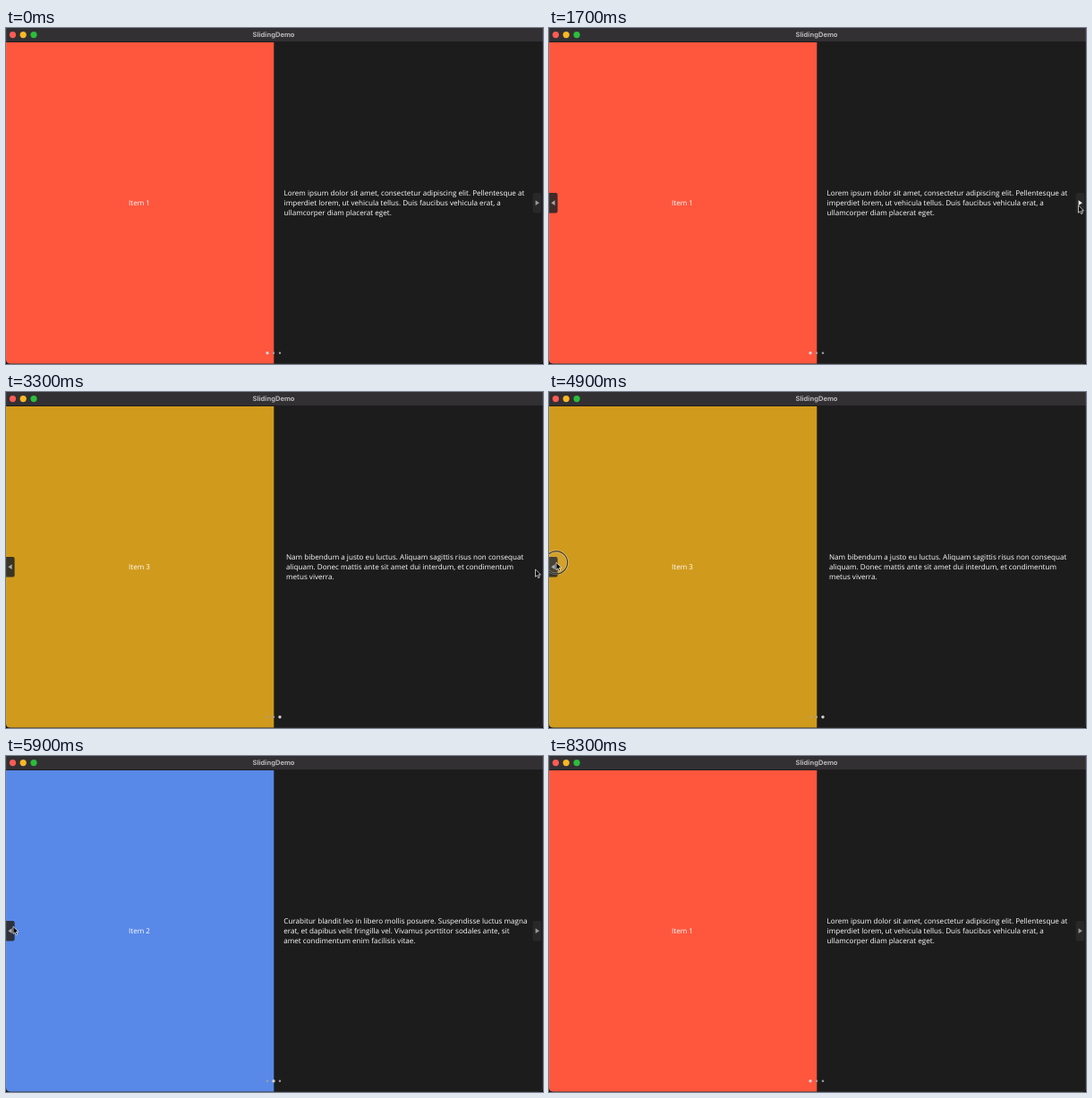
Animation, 600 px wide and 375 px high, one loop 8400 ms. Source, as an HTML page:

```html
<!DOCTYPE html>
<html lang="en">
<head>
<meta charset="utf-8">
<title>Carousel</title>
<style>
  html, body { margin: 0; width: 100%; height: 100%; overflow: hidden; background: #111; }
  svg { display: block; width: 100vw; height: 100vh; }
  text { font: 8.1px "Open Sans", "Noto Sans", sans-serif; fill: #fff; text-rendering: geometricPrecision; }
  .title { font: 700 7.6px Inter, "Liberation Sans", sans-serif; fill: #b7b5b7; }
</style>
</head>
<body>
<svg viewBox="0 0 600 375">
  <defs>
    <clipPath id="window"><path d="M0 0H600V370Q600 374.5 595 374.5H5Q0 374.5 0 370Z"/></clipPath>
    <clipPath id="view"><rect y="16" width="600" height="359"/></clipPath>
  </defs>
  <g clip-path="url(#window)">
    <rect width="600" height="375" fill="#1c1c1c"/>
    <g clip-path="url(#view)"><g id="track"></g></g>
    <rect width="600" height="16" fill="#323033"/>
    <rect y="15.3" width="600" height=".7" fill="#171517"/>
    <circle cx="7.5" cy="7.6" r="3.6" fill="#fc5b55"/>
    <circle cx="19.2" cy="7.6" r="3.6" fill="#fab726"/>
    <circle cx="31" cy="7.6" r="3.6" fill="#2cbd3c"/>
    <text class="title" x="299" y="10" text-anchor="middle">SlidingDemo</text>
    <g id="pips"></g>
    <g id="prev">
      <rect x="-3" y="184" width="12.6" height="22.5" rx="2" fill="#262626" fill-opacity=".88"/>
      <path d="M6.6 192.3V198L2.4 195.2Z" fill="#a6a8ac"/>
    </g>
    <g id="next">
      <rect x="588.6" y="184" width="9.6" height="22.5" rx="2" fill="#282828"/>
      <path id="nextMark" d="M591.6 192.3V198L595.9 195.2Z"/>
    </g>
  </g>
  <path d="M.3 0V370Q.3 374.5 5 374.5H595Q599.6 374.5 599.6 370V0" fill="none" stroke="#fff" stroke-opacity=".12" stroke-width=".7"/>
  <g id="pointer">
    <g id="ring" fill="none">
      <circle r="12.6" fill="#fff" fill-opacity=".07" stroke="#fff" stroke-opacity=".32" stroke-width="2.8"/>
      <circle r="12.6" stroke="#252525" stroke-width="1.2" stroke-opacity=".85"/>
    </g>
    <path d="M0 0V8.2L1.9 6.5L3.2 9.5L4.7 8.9L3.4 5.9H6Z" fill="#000" stroke="#fff" stroke-width=".7" stroke-linejoin="round"/>
  </g>
</svg>
<script>
const LOOP = 8400, STEP = 100;
const $ = id => document.getElementById(id);

const slides = [
  { color: '#ff563e', x: 310.6, lines: [
    'Lorem ipsum dolor sit amet, consectetur adipiscing elit. Pellentesque at',
    'imperdiet lorem, ut vehicula tellus. Duis faucibus vehicula erat, a',
    'ullamcorper diam placerat eget.'] },
  { color: '#5888e8', x: 310.3, lines: [
    'Curabitur blandit leo in libero mollis posuere. Suspendisse luctus magna',
    'erat, et dapibus velit fringilla vel. Vivamus porttitor sodales ante, sit',
    'amet condimentum enim facilisis vitae.'] },
  { color: '#d09a1c', x: 313, lines: [
    'Nam bibendum a justo eu luctus. Aliquam sagittis risus non consequat',
    'aliquam. Donec mattis ante sit amet dui interdum, et condimentum',
    'metus viverra.'] }
];

// Page turns: start, end, from, to
const turns = [
  [1700, 2050, 0, 1], [2900, 3250, 1, 2],
  [5000, 5350, 2, 1], [5990, 6280, 1, 0]
];
const presses = [[1500, 1700], [2700, 2900], [4800, 5000], [5950, 6050]];

// Pointer path: time, x, y
const path = [
  [300, 480, 374], [1100, 591.5, 198], [3600, 591.5, 198],
  [4600, 8, 190.3], [6500, 8, 190.3], [6900, 27.8, 190.8], [7200, 47, 191]
];

const ease = u => 1 - (1 - u) ** 3;
const smooth = u => u * u * (3 - 2 * u);
const show = (el, on) => el.setAttribute('visibility', on ? 'visible' : 'hidden');

$('track').innerHTML = slides.map((s, i) => `<g transform="translate(${i * 600})">
  <rect width="299.3" height="375" fill="${s.color}"/>
  <text x="149" y="198.1" text-anchor="middle">Item ${i + 1}</text>
  ${s.lines.map((line, n) => `<text x="${s.x}" y="${187.1 + n * 11.05}">${line}</text>`).join('')}
</g>`).join('');
$('pips').innerHTML = slides.map((s, i) => `<circle cx="${292 + i * 7}" cy="362.7"/>`).join('');

function pageAt(t) {
  let pos = 0, page = 0, goal = 0;
  for (const [start, end, from, to] of turns) {
    if (t < start) break;
    const u = Math.min(1, (t - start) / (end - start));
    pos = from + (to - from) * ease(u);
    page = u < 1 ? from : to;
    goal = to;
  }
  return { pos, page, goal };
}

function pointAt(t) {
  const i = path.findIndex(p => p[0] > t);
  if (i < 0) return path[path.length - 1].slice(1);
  if (i === 0) return path[0].slice(1);
  const [a, ax, ay] = path[i - 1], [b, bx, by] = path[i];
  const u = smooth((t - a) / (b - a));
  return [ax + (bx - ax) * u, ay + (by - ay) * u];
}

function draw(t) {
  const { pos, page, goal } = pageAt(t);
  $('track').setAttribute('transform', `translate(${-600 * pos})`);
  [...$('pips').children].forEach((pip, i) => {
    pip.setAttribute('r', i === page ? 1.7 : 1.2);
    pip.setAttribute('fill', i === page ? '#d0d0d0' : '#a0a0a0');
  });
  show($('prev'), goal > 0);
  show($('next'), goal < 2);

  const [x, y] = pointAt(t);
  $('nextMark').setAttribute('fill', x > 585 ? '#eee' : '#999');
  $('pointer').setAttribute('transform', `translate(${x} ${y})`);
  $('pointer').setAttribute('display', t >= 300 && t < 7400 ? 'inline' : 'none');
  show($('ring'), presses.some(([a, b]) => t >= a && t < b));
}

const origin = performance.now();
function tick() {
  const t = (performance.now() - origin) % LOOP;
  draw(Math.floor(t / STEP) * STEP);
  requestAnimationFrame(tick);
}
tick();
</script>
</body>
</html>
```
